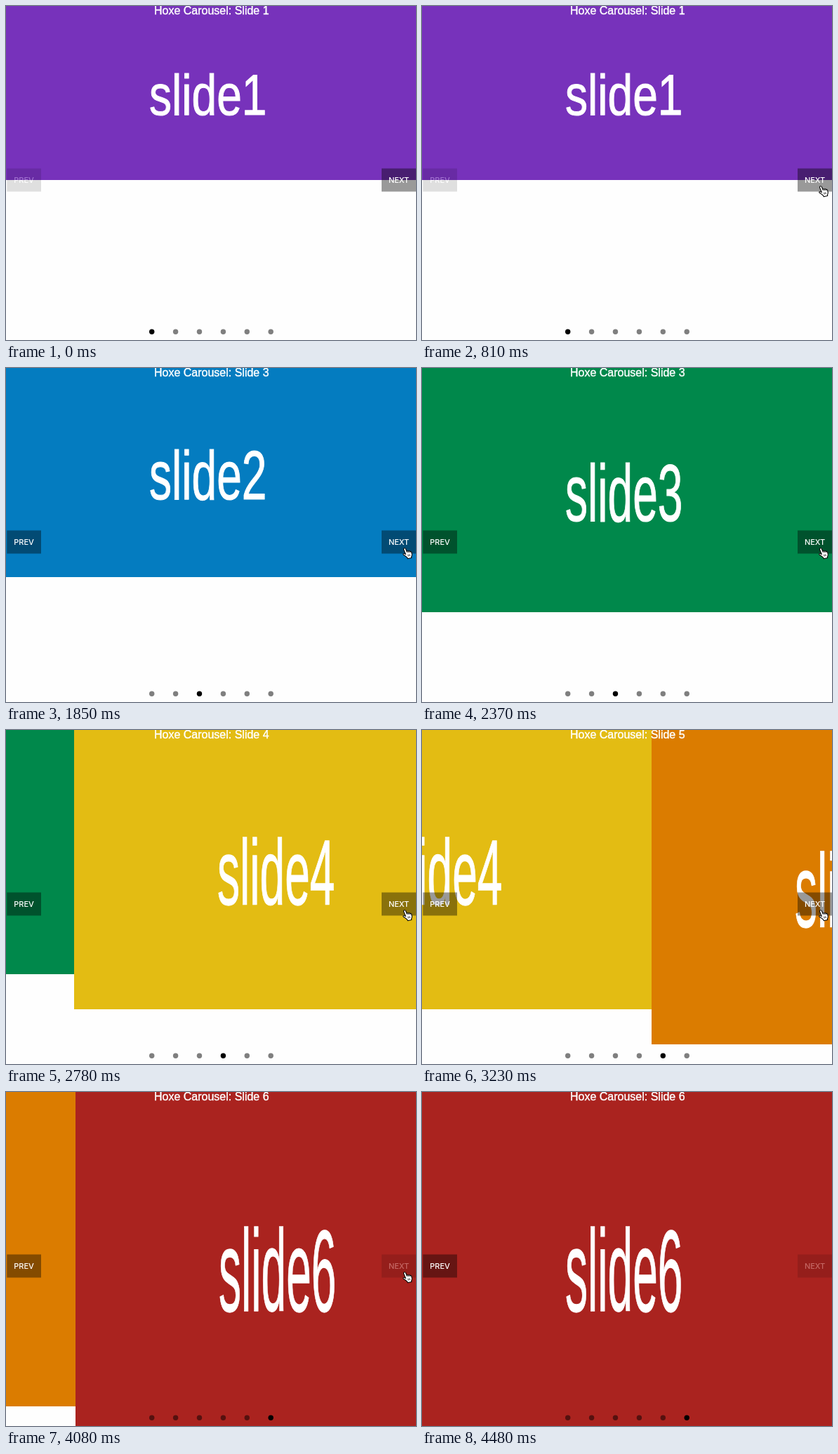
An HTML page for the animation above (5080 ms loop, 584 by 476 pixels).

```html
<!DOCTYPE html>
<html lang="en">
<head>
<meta charset="utf-8">
<title>Carousel</title>
<style>
  html, body { margin: 0; width: 100%; height: 100%; overflow: hidden; background: #fefefe; }
  svg { display: block; width: 584px; height: 476px; }
  text { fill: #fff; font-family: "Liberation Sans", Arial, sans-serif; }
  .label { font-size: 64.1px; stroke: #fff; stroke-width: 1px; vector-effect: non-scaling-stroke; }
  #title { font-size: 16px; text-anchor: middle; stroke: #fff; stroke-width: .4px; }
  .button rect { fill: rgba(0, 0, 0, .4); }
  .button text { font: 500 11px Inter, sans-serif; text-anchor: middle; }
</style>
</head>
<body>
<svg viewBox="0 0 584 476">
  <g id="strip"></g>
  <text id="title" x="292.8" y="12"></text>
  <g id="dots"></g>
  <g id="prev" class="button">
    <rect x="1.3" y="231.5" width="48.7" height="33"/>
    <text x="25.6" y="252">PREV</text>
  </g>
  <g id="next" class="button">
    <rect x="535" y="231.5" width="49" height="33"/>
    <text x="559.6" y="252">NEXT</text>
  </g>
  <g id="hand" stroke="#000" stroke-linejoin="round">
    <path fill="#fff" d="M2.6 1.2C3.4.4 4.6.8 5 2l1.2 3.2c.4-.7 1.7-.8 2.1.1.5-.7 1.7-.6 2 .3.6-.5 1.7-.2 2 .8l.7 3c.2 1.5-.5 2.5-.7 3.8l.2 1.3-5 1.2-.5-1.3C5.8 13 4.2 11.5 2 10.2c-1-.8-.2-2 1-1.6l1.9 1L2.5 3.4C2.1 2.4 2.1 1.7 2.6 1.2z"/>
    <path fill="none" stroke-width=".8" d="M6.2 5.2l.7 2M8.3 5.3l.5 1.9M10.3 5.6l.4 1.6M7.8 9.8l.6 2.6M9.6 9.5l.6 2.5"/>
  </g>
</svg>
<script>
const LOOP = 5080, WIDTH = 584, DURATION = 500;
const colors = ['#7732bb', '#047cc0', '#00884b', '#e3bc13', '#db7c00', '#aa231f'];

// Each move: animation start, first and last repaint, number of repaints
const moves = [
  [1106, 1160, 1670, 10],
  [1850, 1850, 2370, 10],
  [2548, 2600, 3060, 9],
  [3179, 3230, 3730, 10],
  [3855, 3900, 4370, 9]
];

// Pointer: time, x, y; no position means hidden
const pointer = [
  [0], [660, 577, 264], [730, 569, 259], [810, 564, 256], [4430, 570, 269], [4480]
];

const $ = id => document.getElementById(id);
const easeCircleOut = t => Math.sqrt(1 - (1 - t) ** 2);
const clamp = t => Math.min(1, Math.max(0, t));

// Labels are stretched along with the height of their slide
$('strip').innerHTML = colors.map((color, i) => {
  const height = 248 + 50 * i;
  return `<g transform="translate(${i * WIDTH})">
    <rect width="${WIDTH}" height="${height}" fill="${color}"/>
    <text class="label" x="204" y="121.1" transform="scale(1 ${height / 193.4})">slide${i + 1}</text>
  </g>`;
}).join('');

$('dots').innerHTML = colors.map((_, i) =>
  `<circle cx="${207.7 + 33.9 * i}" cy="464.2" r="3.7"/>`).join('');

function render(time) {
  let current = 0, position = 0;
  moves.forEach(([start, first, last, count], i) => {
    if (time < first) return;
    const step = (last - first) / (count - 1);
    const painted = first + Math.floor((time - first + 1) / step) * step;
    current = i + 1;
    position = i + easeCircleOut(clamp((painted - start) / DURATION));
  });

  $('strip').setAttribute('transform', `translate(${-Math.round(position * WIDTH)})`);
  $('title').textContent = `Hoxe Carousel: Slide ${current + 1}`;
  [...$('dots').children].forEach((dot, i) =>
    dot.setAttribute('opacity', i === current ? 1 : .5));
  $('prev').setAttribute('opacity', current === 0 ? .3 : 1);
  $('next').setAttribute('opacity', current === colors.length - 1 ? .3 : 1);

  const [, x, y] = pointer.filter(([at]) => at <= time).pop();
  $('hand').setAttribute('visibility', x ? 'visible' : 'hidden');
  if (x) $('hand').setAttribute('transform', `translate(${x} ${y}) scale(1.1 1)`);
}

const origin = performance.now();
function frame() {
  render((performance.now() - origin) % LOOP);
  requestAnimationFrame(frame);
}
frame();
</script>
</body>
</html>
```
